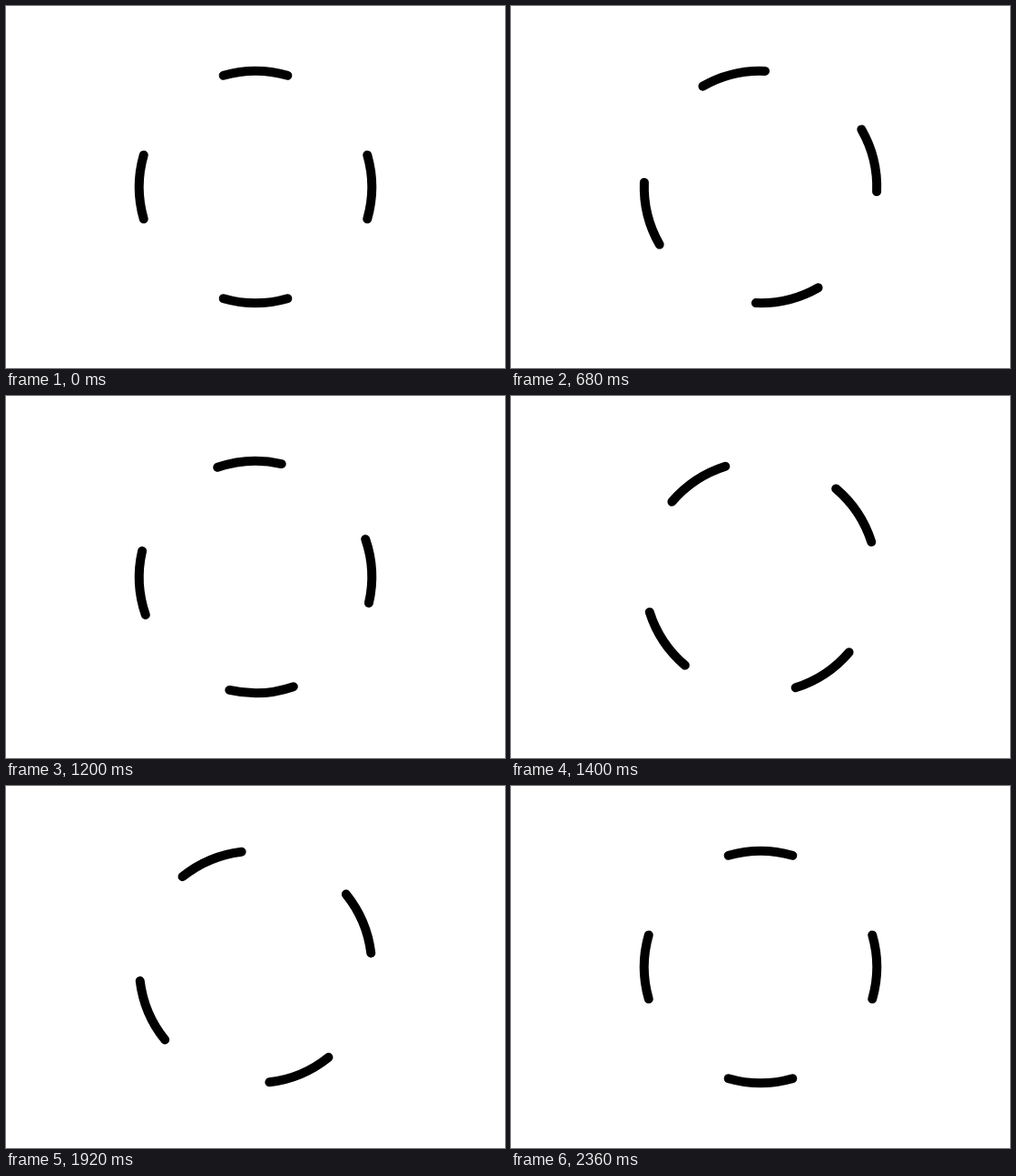
These frames come from a looping animation (550x400 px, 2.4 s). An HTML page with a canvas:

```html
<!DOCTYPE html>
<html lang="en">
<head>
<meta charset="utf-8">
<title>Rotating dashes</title>
<style>
  html, body { margin: 0; width: 100%; height: 100%; overflow: hidden; background: #fff; }
  canvas { display: block; }
</style>
</head>
<body>
<canvas id="stage" width="550" height="400"></canvas>
<script>
const ctx = document.getElementById('stage').getContext('2d');
const STEP_MS = 40, STEPS = 60;
const RADIUS = 128.2, HALF_ARC = 16 * Math.PI / 180;

ctx.lineWidth = 10;
ctx.lineCap = 'round';

function draw() {
  // One full counter-clockwise turn; the first and last step share a pose.
  const step = Math.floor(performance.now() / STEP_MS) % STEPS;
  const turn = -2 * Math.PI * step / (STEPS - 1);

  ctx.clearRect(0, 0, 550, 400);
  for (let i = 0; i < 4; i++) {
    const mid = turn + i * Math.PI / 2;
    ctx.beginPath();
    ctx.arc(275, 200, RADIUS, mid - HALF_ARC, mid + HALF_ARC);
    ctx.stroke();
  }
  requestAnimationFrame(draw);
}
draw();
</script>
</body>
</html>
```
